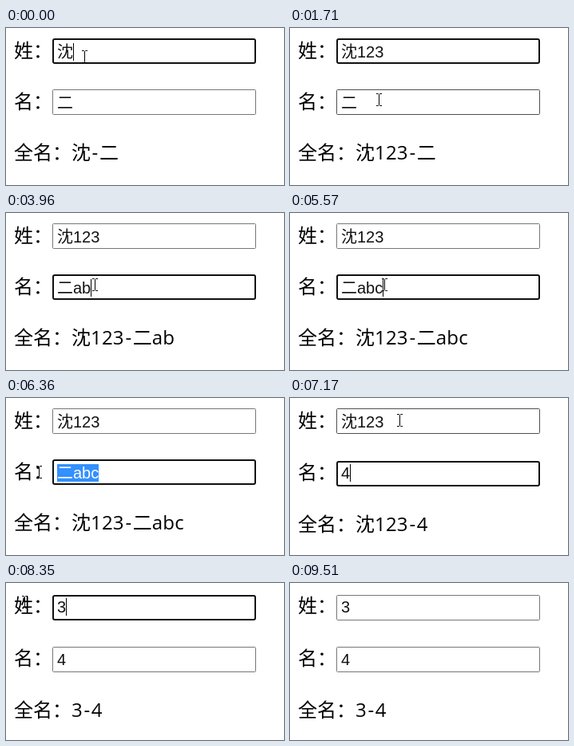
Animation, 348 px wide and 197 px high, one loop 9610 ms. Source, as an HTML page:

```html
<!DOCTYPE html>
<html lang="zh-CN">
<head>
<meta charset="utf-8">
<title>全名</title>
<style>
  html, body { margin: 0; width: 100%; height: 100%; overflow: hidden; background: #fff; }
  #stage { position: relative; width: 348px; height: 197px; overflow: hidden; color: #000; }
  #stage > * { position: absolute; white-space: pre; }
  .label { left: 10px; font: 24px/33px "Open Sans", "Noto Sans CJK SC", "Noto Sans CJK", sans-serif; }
  .latin { letter-spacing: .2px; }
  .dash { padding: 0 1.6px; }
  .box { left: 58px; width: 255px; height: 32px; box-sizing: border-box; border: 1px solid #767676; border-radius: 1.5px; }
  .box.hover { border-color: #4f4f4f; }
  .box.focus { border: 2px solid #101010; border-radius: 3px; }
  .value { left: 64px; color: #111; font: 300 20px/22px "Liberation Sans", "Noto Sans CJK SC", "Noto Sans CJK", sans-serif; }
  .value mark { display: inline-block; height: 22px; background: #3390ff; color: #fff; }
  .value i { display: inline-block; width: 1px; height: 22px; margin-right: -1px; background: #000; vertical-align: top; }
  #pointer { left: 0; top: 0; overflow: visible; }
</style>
</head>
<body>
<div id="stage">
  <div class="label" id="label0">姓：</div>
  <div class="label" id="label1">名：</div>
  <div class="label" id="full"></div>
  <div class="box" id="box0"></div>
  <div class="box" id="box1"></div>
  <div class="value" id="value0"></div>
  <div class="value" id="value1"></div>
  <svg id="pointer" width="1" height="1">
    <path id="beam" d="M-3-7.5h2.5l1 1 1-1H4M-3 7.5h2.5l1-1 1 1H4M.5-6.5v13" fill="none" stroke="#000"/>
    <path id="arrow" d="M0 0v16l4-3.5 2.5 6 2.5-1-2.5-6h5z" fill="#fff" stroke="#000"/>
  </svg>
</div>
<script>
const LOOP = 9610;
const $ = id => document.getElementById(id);
const within = (t, [from, to]) => t >= from && t < to;

// Each entry: [start time, value]
const surname = [[0, '沈'], [340, '沈1'], [770, '沈12'], [1110, '沈123'], [8350, '3']];
const given = [[0, '二'], [3500, '二a'], [3960, '二ab'], [4390, '二abc'], [6720, '4']];
const focus = [[0, 0], [1860, 1], [7260, 0], [9510, -1]];
const layout = [
  [0, { box: [13, 77], text: [37, 101], label: [37, 101, 165] }],
  [6720, { box: [13, 79], text: [37, 101], label: [37, 102, 167] }],
  [8350, { box: [15, 80], text: [37, 103], label: [37, 103, 168] }],
];
const caretOff = [[1620, 1860], [2420, 2880], [3410, 3500], [4920, 5390], [8890, 9430]];
const drags = [[7350, 8350], [5840, 6720]];

// Each move: first step time, last step time, step count, destination
const moves = [
  [1480, 1710, 4, 111, 90],
  [5570, 5660, 2, 125, 90],
  [5840, 6200, 5, 47, 93],
  [6360, 6360, 1, 41, 93],
  [6450, 6450, 1, 33, 93],
  [6720, 7170, 6, 137, 28],
  [7260, 7260, 1, 123, 29],
  [7350, 7560, 3, 80, 28],
  [7650, 8190, 7, 23, 24],
  [8440, 8890, 6, 250, 150],
  [8980, 9250, 4, 262, 210],
];

const valueAt = (track, t) => track.filter(([start]) => start <= t).pop()[1];

function pointerAt(t) {
  let x = 98, y = 36;
  for (const [start, end, steps, toX, toY] of moves) {
    if (t < start) break;
    const gap = (end - start) / (steps - 1) || 1;
    const part = Math.min(steps, Math.floor((t - start) / gap + 1.001)) / steps;
    x += (toX - x) * part;
    y += (toY - y) * part;
  }
  return [Math.round(x), Math.round(y)];
}

// Characters whose centre lies right of the pointer are selected.
function selectionStart(text, pointerX) {
  let x = 64;
  for (let i = 0; i < text.length; i++) {
    const width = text.charCodeAt(i) > 255 ? 20 : 11;
    if (x + width / 2 > pointerX) return i;
    x += width;
  }
  return text.length;
}

function setHTML(node, html) {
  if (node.shown !== html) node.innerHTML = node.shown = html;
}

function render(t) {
  const texts = [valueAt(surname, t), valueAt(given, t)];
  const focused = valueAt(focus, t);
  const { box, text, label } = valueAt(layout, t);
  const [px, py] = pointerAt(t);
  const dragging = drags.some(span => within(t, span));
  let overInput = false;

  texts.forEach((value, i) => {
    const hover = px >= 58 && px < 313 && py >= box[i] && py < box[i] + 32;
    overInput ||= hover;
    $('box' + i).style.top = box[i] + 'px';
    $('box' + i).className = 'box' + (focused === i ? ' focus' : hover ? ' hover' : '');

    const cut = within(t, drags[i]) ? selectionStart(value, px) : value.length;
    const selected = value.slice(cut);
    const caret = focused === i && !selected && !caretOff.some(span => within(t, span));
    $('value' + i).style.top = text[i] - 18 + 'px';
    setHTML($('value' + i), value.slice(0, cut) +
      (selected ? `<mark>${selected}</mark>` : '') + (caret ? '<i></i>' : ''));
  });

  ['label0', 'label1', 'full'].forEach((id, i) => $(id).style.top = label[i] - 26 + 'px');
  const [first, last] = texts.map(s => s.replace(/\w+/, '<span class="latin">$&</span>'));
  setHTML($('full'), `全名：${first}<span class="dash">-</span>${last}`);

  const overLabel = px >= 10 && px < 58 && label.some(base => py > base - 26 && py < base + 7);
  const beam = dragging || overInput || overLabel;
  $('beam').style.display = beam ? '' : 'none';
  $('arrow').style.display = beam ? 'none' : '';
  $('pointer').style.transform = `translate(${px}px, ${py}px)`;
}

function tick() {
  render(performance.now() % LOOP);
  requestAnimationFrame(tick);
}
tick();
</script>
</body>
</html>
```
